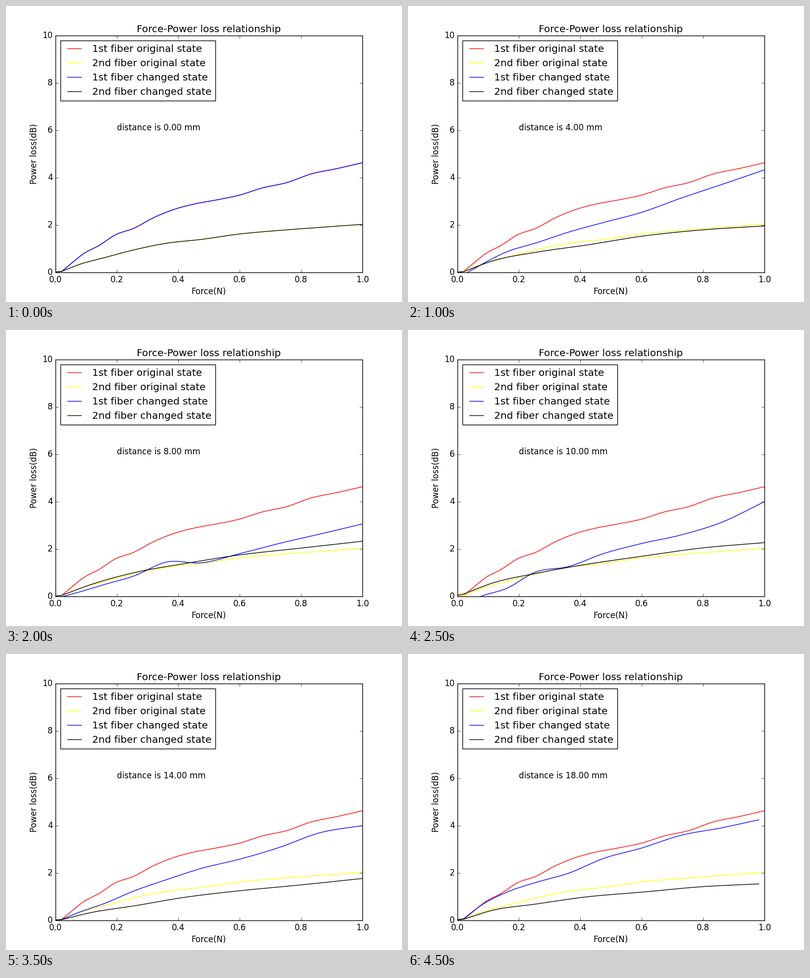
Animation of 800x600 px, one loop 5000 ms. Source, as a matplotlib script:

```python
import numpy as np
import matplotlib.pyplot as plt
from matplotlib.animation import FuncAnimation

plt.style.use("classic")
plt.rcParams["font.family"] = "DejaVu Sans"

FRAMES, INTERVAL, STEP_MM = 10, 500, 2
START = .02  # force at which the loss begins to rise

# Power loss (dB) at forces given by spread()
base_1 = [.04, .35, .79, 1.13, 1.59, 1.86, 2.3, 2.65, 2.89, 3.06, 3.26,
          3.57, 3.79, 4.16, 4.38, 4.63]
base_2 = [.04, .33, .62, .95, 1.23, 1.395, 1.62, 1.77, 1.9, 2.03]

distances = [2, 4, 8, 10, 14, 18]
fiber_1 = np.array([
    [.19, .57, .93, 1.46, 1.97, 2.54, 3.07, 3.74, 4.06, 4.25],
    [-.1, .32, .86, 1.24, 1.7, 2.11, 2.53, 3.13, 3.71, 4.33],
    [-.02, .18, .5, .86, 1.45, 1.42, 1.8, 2.23, 2.63, 3.06],
    [-.35, 0, .33, 1.03, 1.26, 1.81, 2.23, 2.59, 3.13, 4],
    [.04, .34, .71, 1.24, 1.72, 2.2, 2.58, 3.07, 3.7, 4],
    [.07, .63, 1.18, 1.6, 1.99, 2.62, 3.05, 3.59, 3.91, 4.25],
])
fiber_2 = np.array([
    [.07, .455, .855, 1.23, 1.54, 1.9, 2.12],
    [.03, .49, .85, 1.15, 1.525, 1.79, 1.96],
    [.04, .5, 1, 1.38, 1.75, 2.03, 2.33],
    [.1, .57, .97, 1.35, 1.69, 2.04, 2.27],
    [.03, .33, .61, .97, 1.25, 1.49, 1.77],
    [.05, .43, .69, .99, 1.19, 1.42, 1.54],
])


def spread(n):
    """Forces that lie closer together near the start."""
    return START + (1 - START) * np.linspace(0, 1, n) ** 1.3


def curve(y, end=1):
    """Smooth cubic through the values, with a short flat lead-in."""
    y = np.asarray(y)
    x = spread(len(y))
    x[-1] = end
    slope = np.gradient(y, x)
    xs = np.linspace(START, end, 200)
    i = np.clip(np.searchsorted(x, xs) - 1, 0, len(x) - 2)
    h = x[i + 1] - x[i]
    t = (xs - x[i]) / h
    rise = y[i + 1] - y[i]
    bend = (1 - t) * (h * slope[i] - rise) + t * (rise - h * slope[i + 1])
    ys = y[i] + t * rise + t * (1 - t) * bend
    return np.r_[0, xs], np.r_[y[0] / 2, ys]


def at_distance(table, mm):
    return [np.interp(mm, distances, column) for column in table.T]


fig, ax = plt.subplots(figsize=(8, 6), dpi=100, facecolor="white")
ax.set(xlim=(0, 1), ylim=(0, 10), xlabel="Force(N)", ylabel="Power loss(dB)",
       title="Force-Power loss relationship")

ax.plot(*curve(base_1), "red", label="1st fiber original state")
ax.plot(*curve(base_2), "yellow", label="2nd fiber original state")
line_1, = ax.plot([], [], "blue", label="1st fiber changed state")
line_2, = ax.plot([], [], "black", label="2nd fiber changed state")
caption = ax.text(.2, 6, "")
ax.legend(loc="upper left")


def update(frame):
    mm = frame * STEP_MM
    if mm == 0:
        line_1.set_data(*curve(base_1))
        line_2.set_data(*curve(base_2))
    else:
        # the last measurement stops short of full force
        end = .982 if mm == distances[-1] else 1
        line_1.set_data(*curve(at_distance(fiber_1, mm), end))
        line_2.set_data(*curve(at_distance(fiber_2, mm), end))
    caption.set_text(f"distance is {mm:.2f} mm")
    return line_1, line_2, caption


anim = FuncAnimation(fig, update, frames=FRAMES, interval=INTERVAL,
                     init_func=lambda: update(0), repeat=True, repeat_delay=0)
plt.show()
```
